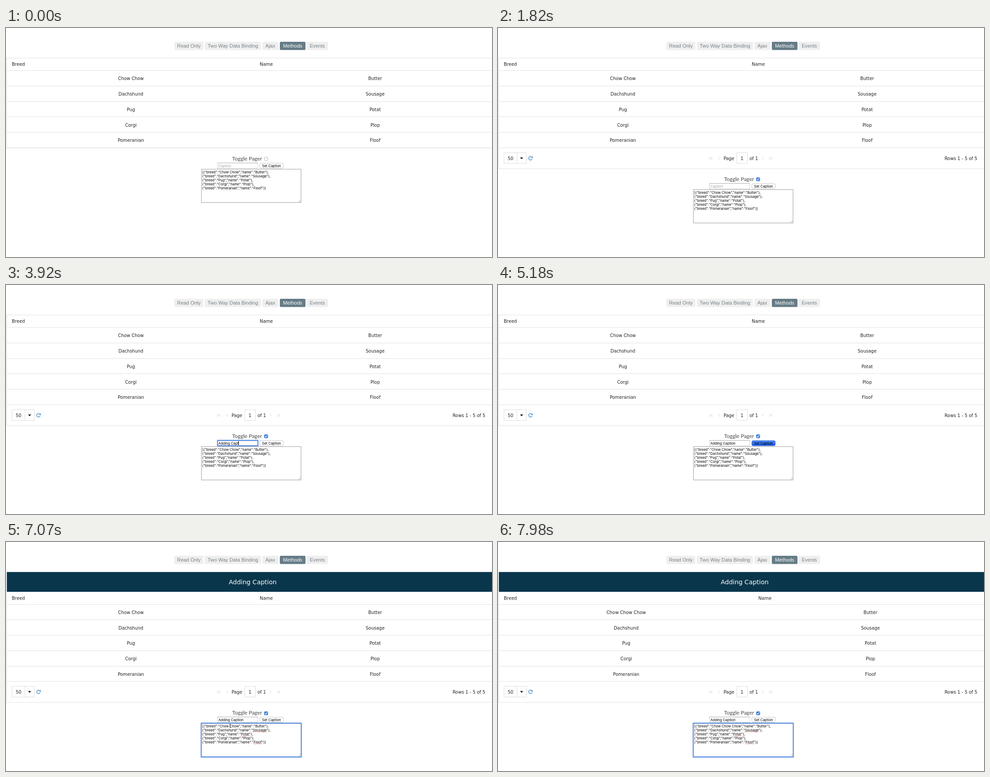
Recreate the animation shown at these times as an HTML page with a canvas. Size 1088 by 515 pixels, loop 8 s.

```html
<!DOCTYPE html>
<html lang="en">
<head>
<meta charset="utf-8">
<title>Table methods demo</title>
<style>
html, body { margin: 0; width: 100%; height: 100%; overflow: hidden; background: #fff; }
canvas { display: block; width: 1088px; height: 515px; }
</style>
</head>
<body>
<canvas id="stage"></canvas>
<script>
const W = 1088, H = 515, LOOP = 8000;
const canvas = document.getElementById('stage');
const ctx = canvas.getContext('2d');
const dpr = window.devicePixelRatio || 1;
canvas.width = W * dpr;
canvas.height = H * dpr;

const HEAD = '10px "DejaVu Sans", sans-serif';
const TABLE = '9.9px "DejaVu Sans", sans-serif';
const TITLE = '14px "DejaVu Sans", sans-serif';
const TAB = '11.2px "Liberation Sans", Arial, sans-serif';
const LABEL = '12px Lato, sans-serif';
const FORM = '7.7px Inter, sans-serif';
const AREA = '7.53px Inter, sans-serif';
const INK = '#222', RULE = '#e1e1e1', RING = '#4f86dc';

const CAPTION = 'Adding Caption';
const TYPED = 'Chow ';
const DOGS = [['Chow Chow', 'Butter'], ['Dachshund', 'Sousage'], ['Pug', 'Potat'],
  ['Corgi', 'Plop'], ['Pomeranian', 'Floof']];
const MISSPELT = ['Sousage', 'Potat', 'Floof'];
const TABS = [['Read Only', 377, 65], ['Two Way Data Binding', 445, 126], ['Ajax', 574, 35.5],
  ['Methods', 613, 57.5], ['Events', 673, 48]];

const T = { press: 1190, pager: 1400, focus: 2240, type: 2590, click: 5180, caption: 5250, edit: 5950, insert: 7140 };

const clamp = (v, lo, hi) => Math.max(lo, Math.min(hi, v));

function rect(x, y, w, h, color) {
  ctx.fillStyle = color;
  ctx.fillRect(x, y, w, h);
}

function frame(x, y, w, h, color, width = 1) {
  ctx.strokeStyle = color;
  ctx.lineWidth = width;
  ctx.strokeRect(x, y, w, h);
}

function pill(x, y, w, h, r, fill, stroke) {
  ctx.beginPath();
  ctx.roundRect(x, y, w, h, r);
  ctx.fillStyle = fill;
  ctx.fill();
  if (stroke) {
    ctx.strokeStyle = stroke;
    ctx.lineWidth = 1;
    ctx.stroke();
  }
}

function focusRing(x, y, w, h) {
  ctx.lineJoin = 'round';
  frame(x, y, w, h, 'rgba(90, 145, 230, 0.3)', 3);
  frame(x, y, w, h, RING, 1.8);
  ctx.lineJoin = 'miter';
}

function path(points, color, width = 1) {
  ctx.beginPath();
  points.forEach(([x, y], i) => i ? ctx.lineTo(x, y) : ctx.moveTo(x, y));
  ctx.strokeStyle = color;
  ctx.lineWidth = width;
  ctx.stroke();
}

function text(str, x, y, font, color = INK, align = 'left') {
  ctx.font = font;
  ctx.fillStyle = color;
  ctx.textAlign = align;
  ctx.fillText(str, x, y);
}

function width(str, font) {
  ctx.font = font;
  return ctx.measureText(str).width;
}

function drawTabs() {
  for (const [name, x, w] of TABS) {
    const active = name === 'Methods';
    pill(x, 31, w, 18.5, 2.5, active ? '#667c87' : '#efefef');
    text(name, x + w / 2, 44.3, TAB, active ? '#fff' : '#788187', 'center');
  }
}

function drawTable(dy, dogs, pager) {
  const bottom = Math.floor(269.3 + dy + (pager ? 46.7 : 0));
  const grow = 0.243 * (width(dogs[0][0], TABLE) - width(DOGS[0][0], TABLE));
  if (dy) {
    rect(2, 67.5, W - 2, 44.5, '#09364b');
    text(CAPTION, 552.3, 95.3, TITLE, '#fff', 'center');
  } else {
    rect(1, 67, W - 1, 1, RULE);
  }
  rect(1, 67, 1, bottom - 66, RULE);
  text('Breed', 13, 85.2 + dy, HEAD);
  text('Name', 568 + 2 * grow, 85.2 + dy, HEAD);
  dogs.forEach(([breed, name], i) => {
    const top = 95.5 + 34.75 * i + dy;
    rect(2, Math.floor(top), W - 2, 1, RULE);
    text(breed, 279.6 + grow, top + 21.8, TABLE, INK, 'center');
    text(name, 826.4 + grow, top + 21.8, TABLE, INK, 'center');
  });
  if (pager) rect(2, Math.floor(269.3 + dy), W - 2, 1, RULE);
  rect(1, bottom, W - 1, 1, pager ? RULE : '#d2d2d2');
}

function chevron(x, y, dir, bar) {
  path([[x + 1.5 * dir, y - 3], [x - 1.5 * dir, y], [x + 1.5 * dir, y + 3]], '#d0d0d0');
  if (bar) path([[x - 4 * dir, y - 3.5], [x - 4 * dir, y + 3.5]], '#d0d0d0');
}

function drawPager(dy) {
  const y = Math.floor(293 + dy), base = y + 3.7;
  frame(13.5, y - 12.5, 50, 24, '#dcdcdc');
  rect(42, y - 12, 1, 24, '#dcdcdc');
  text('50', 28, base, TABLE, INK, 'center');
  ctx.fillStyle = '#000';
  ctx.beginPath();
  ctx.moveTo(49.3, y - 1.7);
  ctx.lineTo(56.3, y - 1.7);
  ctx.lineTo(52.8, y + 2);
  ctx.fill();

  ctx.strokeStyle = '#3c8ac4';
  ctx.lineWidth = 1.3;
  ctx.beginPath();
  ctx.arc(72.7, y, 4, 0.35, Math.PI * 1.78);
  ctx.stroke();
  ctx.fillStyle = '#3c8ac4';
  ctx.beginPath();
  ctx.moveTo(77.8, y - 4.8);
  ctx.lineTo(77.8, y - 0.8);
  ctx.lineTo(73.8, y - 0.8);
  ctx.fill();

  chevron(478.5, y, 1, true);
  chevron(495, y, 1);
  text('Page', 505, base, TABLE);
  frame(534.5, y - 12.5, 24, 24, '#dcdcdc');
  text('1', 546.2, base, TABLE, INK, 'center');
  text('of 1', 563, base, TABLE);
  chevron(592, y, -1);
  chevron(608.5, y, -1, true);
  text('Rows 1 - 5 of 5', 1073, base, TABLE, INK, 'right');
}

function drawCheckbox(y, checked, pressed) {
  if (checked) {
    pill(578, y - 4, 8.6, 8.4, 2, '#3f82de');
    path([[580, y + 0.4], [581.6, y + 2.2], [584.6, y - 2]], '#fff', 1.2);
  } else {
    pill(578.5, y - 3.5, 7.6, 7.6, 2, pressed ? '#e3e3e3' : '#fff', pressed ? '#a2a2a2' : '#b0b0b0');
  }
}

function drawInput(y, value, focused, caret) {
  rect(473, y, 91, 13, '#fff');
  if (focused) {
    focusRing(473.5, y + 0.5, 90.5, 12);
  } else {
    frame(473.5, y + 0.5, 90, 12, '#cfcfcf');
    rect(473, y, 91, 1, '#a8a8a8');
  }
  text(value || 'Caption', 475.5, y + 9.6, FORM, value ? '#000' : '#a5a5a5');
  if (caret) rect(Math.floor(475.5 + width(value, FORM)), y + 2, 1, 9, '#000');
}

function drawButton(y, pressed) {
  let fill = '#fff';
  if (pressed) {
    fill = ctx.createLinearGradient(0, y, 0, y + 12);
    fill.addColorStop(0, '#4f8df6');
    fill.addColorStop(1, '#1b5be6');
  }
  pill(568.2, y + 1, 52.6, 11.5, 3, fill, pressed ? '#3a6fd8' : '#c6c6c6');
  text('Set Caption', 594.4, y + 9.6, FORM, '#000', 'center');
}

function drawArea(y, dogs, focused, caretText) {
  const lines = dogs.map(([breed, name], i) =>
    `${i ? '' : '['}{"breed":"${breed}","name":"${name}"}${i === 4 ? ']' : ','}`);
  if (focused) focusRing(437, y + 0.5, 224, 76);
  else frame(437.5, y + 0.5, 223, 75, '#9c9c9c');
  path([[654.5, y + 74.5], [659.5, y + 69.5]], '#999', 0.8);
  path([[657.5, y + 74.5], [659.5, y + 72.5]], '#999', 0.8);

  lines.forEach((line, i) => {
    const base = y + 9.6 + 9 * i, name = dogs[i][1];
    text(line, 439, base, AREA, '#000');
    if (!focused || !MISSPELT.includes(name)) return;
    const x = 439 + width(line.slice(0, line.lastIndexOf(name)), AREA);
    const end = x + width(name, AREA);
    for (let d = x; d < end; d += 2) rect(d, base + 1, 1.2, 1, '#e0564c');
  });
  if (caretText !== null) {
    rect(Math.round(439 + width('[{"breed":"' + caretText, AREA)), y + 2, 1, 9, '#000');
  }
}

function draw(t) {
  const pager = t >= T.pager;
  const dy = t >= T.caption ? 44.5 : 0;
  const formY = dy + (pager ? 46 : 0);

  const count = t < T.type ? 0 : clamp(1 + Math.floor((t - T.type) / 123), 0, CAPTION.length);
  const inputFocus = t >= T.focus && t < T.click;
  const inputCaret = inputFocus && t < 4690;

  const added = t < T.insert ? '' : TYPED.slice(0, 1 + Math.floor((t - T.insert) / 90));
  const dogs = [['Chow ' + added + 'Chow', 'Butter'], ...DOGS.slice(1)];
  const editing = t >= T.edit;
  const areaCaret = editing && (t < 6450 || (t >= 7000 && t < 7980));

  ctx.setTransform(dpr, 0, 0, dpr, 0, 0);
  rect(0, 0, W, H, '#fff');
  drawTabs();
  drawTable(dy, dogs, pager);
  if (pager) drawPager(dy);
  text('Toggle Pager', 506.3, 297.6 + formY, LABEL, '#484848');
  drawCheckbox(Math.round(294 + formY), pager, t >= T.press);
  const y = Math.floor(303 + formY);
  drawInput(y, CAPTION.slice(0, count), inputFocus, inputCaret);
  drawButton(y, t >= T.click && t < T.caption);
  drawArea(Math.floor(317 + formY), dogs, editing, areaCaret ? 'Chow ' + added : null);
}

const start = performance.now();
function tick() {
  draw((performance.now() - start) % LOOP);
  requestAnimationFrame(tick);
}
tick();
</script>
</body>
</html>
```
